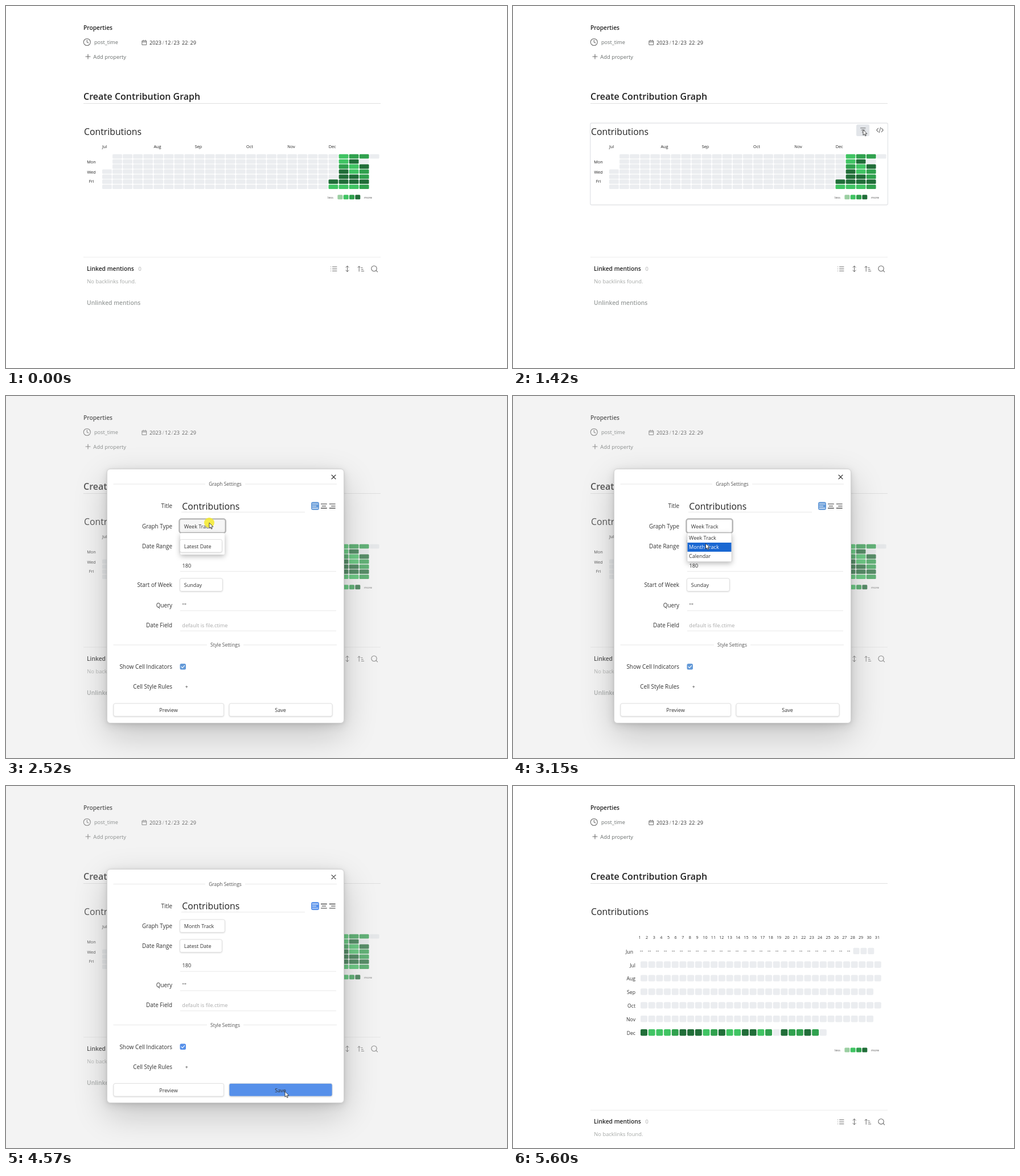
An HTML page that plays this animation: 880 px wide and 637 px high, repeating every 6.23 s.

```html
<!DOCTYPE html>
<html lang="en">
<head>
<meta charset="utf-8">
<title>Contribution graph settings</title>
<style>
html, body { margin: 0; width: 100%; height: 100%; overflow: hidden; background: #fff; }
#stage { position: relative; width: 880px; height: 637px; overflow: hidden; }
#stage > * { position: absolute; left: 0; top: 0; }
svg { width: 880px; height: 637px; font-family: "Open Sans", "Noto Sans", sans-serif; }
#cover { width: 880px; height: 637px; background: rgba(215,215,215,.3); }
#panel {
  left: 177px; width: 417px; box-sizing: border-box; background: #fff;
  border: 1px solid #d2d2d2; border-radius: 6px;
  box-shadow: 0 1px 5px rgba(0,0,0,.07), 0 4px 16px rgba(0,0,0,.11), 0 20px 60px rgba(0,0,0,.2);
}
.raised { filter: drop-shadow(0 1px 1px rgba(0,0,0,.13)); }
.popup { filter: drop-shadow(0 3px 5px rgba(0,0,0,.28)); }
.icon { fill: none; stroke: #6c6c6c; stroke-linecap: round; stroke-linejoin: round; }
</style>
</head>
<body>
<div id="stage">
  <svg id="page"></svg>
  <div id="cover"></div>
  <div id="panel"></div>
  <svg id="form"></svg>
  <svg id="pointer"></svg>
</div>
<script>
const LOOP = 6230, STEP = 80;
const OPEN = 1500, DROP = 2520, PICK = 3540, SAVED = 4650, LEAVE = 5600;
const INK = '#222', GREY = '#6a6f6e';
const EMPTY = '#ebedf0';
const LEVELS = [EMPTY, '#9bcfa2', '#40c463', '#30a14e', '#216e39'];
const DECEMBER = '422234442342244230433430';
const $ = id => document.getElementById(id);
const range = n => [...Array(n).keys()];

// y is the middle of the capitals
const text = (x, y, str, size, fill = INK, anchor = 'start', weight = 400) =>
  `<text x="${x}" y="${y + size * .36}" font-size="${size}" fill="${fill}" text-anchor="${anchor}" font-weight="${weight}">${str}</text>`;
const rect = (x, y, w, h, fill, r = 0, extra = '') =>
  `<rect x="${x}" y="${y}" width="${w}" height="${h}" rx="${r}" fill="${fill}" ${extra}/>`;
const line = (x1, x2, y, color = '#e8e8e8') => rect(x1, y - .5, x2 - x1, 1, color);
const icon = (d, width = 1, extra = '') => `<path class="icon" d="${d}" stroke-width="${width}" ${extra}/>`;
const group = (id, body) => `<g id="${id}">${body}</g>`;
const level = day => LEVELS[+DECEMBER[day]];

function header() {
  const date = [[252, '2023'], [279, '12'], [294.5, '23'], [309, '22'], [323.5, '29']];
  const marks = [[274.4, '/'], [290.4, '/'], [320, ':']];
  return text(136, 38, 'Properties', 10.2, INK, 'start', 600)
    + icon('M148.3 63.5a6 6 0 1 1-12 0a6 6 0 1 1 12 0M142.3 59.8v3.9l2.6 1.3', 1.1)
    + text(155, 64, 'post_time', 9.15, GREY)
    + icon('M239.3 61.3h7.4v7h-7.4zM239.3 63.3h7.4M241.2 60v1M244.8 60v1')
    + date.map(([x, s]) => text(x, 64.5, s, 9.15, '#333')).join('')
    + marks.map(([x, s]) => text(x, 64.5, s, 9.15, '#999')).join('')
    + icon('M140 89h8M144 85v8', 1.1)
    + text(153.3, 89.3, 'Add property', 9.4, GREY)
    + text(136, 159.3, 'Create Contribution Graph', 16, INK, 'start', 600)
    + line(136, 658, 171.5, '#e0e0e0')
    + text(137, 221, 'Contributions', 15.8);
}

function weekGraph() {
  const months = [[169, 'Jul'], [259.5, 'Aug'], [331.7, 'Sep'], [422, 'Oct'], [494.3, 'Nov'], [566.7, 'Dec']];
  const days = [['Mon', 274.3], ['Wed', 292], ['Fri', 308.8]];
  const cells = range(180).map(i => {
    const slot = i + 3, day = i - 156;
    return rect(169 + Math.floor(slot / 7) * 18.07, 260.8 + slot % 7 * 8.9, 16.8, 7.8,
      day < 0 ? EMPTY : level(day), 1.5);
  });
  return months.map(([x, s]) => text(x, 247, s, 7.3)).join('')
    + days.map(([s, y]) => text(150, y, s, 7.3, INK, 'middle')).join('')
    + cells.join('');
}

function monthGraph() {
  const months = [['Jun', 30], ['Jul', 31], ['Aug', 31], ['Sep', 30], ['Oct', 31], ['Nov', 30], ['Dec', 24]];
  const numbers = range(31).map(i =>
    text(i < 9 ? 222.5 + i * 12.62 : 337.5 + (i - 9) * 14.4, 266.3, i + 1, 7.2, '#333', 'middle'));
  const rows = months.map(([name, count], m) => {
    const y = 290.4 + m * 23.88;
    const cells = range(count).map(i => {
      if (m === 0) {
        return i < 27
          ? rect(223.2 + i * 14, y - .4, 2, 1, '#777') + rect(226 + i * 14, y - .4, 2, 1, '#777')
          : rect(597.5 + (i - 27) * 12.9, y - 5.7, 11, 11.4, EMPTY, 2);
      }
      return rect(224 + i * 13.69, y - 5.7, 12, 11.4, m === 6 ? level(i) : EMPTY, 2);
    });
    return text(m ? 215 : 211, y + 1.2, name, 8.7, '#333', 'end') + cells.join('');
  });
  return numbers.join('') + rows.join('');
}

function footer() {
  return text(565, 336.7, 'less', 5.6, '#555')
    + range(4).map(i => rect(582.4 + i * 10.3, 332.2, 9, 8, LEVELS[i + 1], 1.5)).join('')
    + text(629, 336.7, 'more', 5.6, '#555')
    + line(136, 658, 442, '#ececec')
    + text(142, 461.8, 'Linked mentions', 10.3, INK, 'start', 600)
    + text(232.5, 462.5, '0', 9.2, '#aaa')
    + icon('M573.5 459h7.5M573.5 462.6h7.5M573.5 466.2h7.5M570.6 459h.1M570.6 462.6h.1M570.6 466.2h.1')
    + icon('M599.5 457.5v10M596.9 460l2.6-2.6l2.6 2.6M596.9 465l2.6 2.6l2.6-2.6')
    + icon('M620.2 467v-9M618 460.2l2.2-2.3l2.2 2.3M624.3 460.5h1.6M624.3 463.4h3M624.3 466.4h4.4')
    + icon('M651.2 462a4.7 4.7 0 1 1-9.4 0a4.7 4.7 0 1 1 9.4 0M650 465.3l2.6 2.5', 1.1)
    + text(142.3, 484.5, 'No backlinks found.', 9.35, '#a5a8a6')
    + text(142, 522.7, 'Unlinked mentions', 10.3, '#999d9c', 'start', 600);
}

function hoverFrame() {
  return rect(135.8, 206, 522.6, 144, 'none', 2.5, 'stroke="#e3e5e8" stroke-width="1.3"')
    + rect(603, 208.5, 23, 20.5, '#e2e5e9', 2.5, 'id="tune"')
    + icon('M610.5 214.7h8.5M612 218.2h6M613.2 221.7h3.5', 1.1)
    + icon('M641.6 215.2l-3 3.2l3 3.2M647.2 215.2l3 3.2l-3 3.2M645.5 213.8l-2.2 9', 1.1);
}

const label = (y, str) => text(292, y, str, 9.9, '#333', 'end');
const box = (x, y, w, id = '') =>
  rect(x, y, w, 22.6, '#fff', 3, `class="raised" stroke="#d8d8d8" stroke-width=".8" id="${id}"`);
const picker = (y, w, str, ids = ['', '']) =>
  box(305.4, y - 11.6, w, ids[0])
  + `<g id="${ids[1]}">${text(312.7, y + .3, str, 9.1, '#333')}</g>`;
const section = (y, str, x1, x2) =>
  line(188.5, x1, y) + line(x2, 581, y) + text(385, y + .3, str, 8.4, '#555', 'middle');

function upper() {
  const bars = [[537.6, 'start'], [553, 'middle'], [567.8, 'end']].map(([x, side], n) => {
    const rows = [0, 1, 2].map(i => {
      const w = i === 1 ? 7.5 : 10.8;
      const dx = { start: 0, middle: (10.8 - w) / 2, end: 10.8 - w }[side];
      return `M${x + dx} ${190 + i * 3.7}h${w}`;
    });
    return `<path d="${rows.join('')}" stroke="${n ? '#333' : '#fff'}" stroke-width="1.1"/>`;
  });
  return icon('M572 139l7 7M579 139l-7 7', 1.1, 'style="stroke:#333"')
    + section(155, 'Graph Settings', 350, 420)
    + label(193.6, 'Title') + text(309.3, 194, 'Contributions', 15.8) + line(308, 525, 204.3)
    + rect(536, 186.6, 14, 14, '', 3, 'class="accent"') + bars.join('')
    + label(229, 'Graph Type') + picker(229, 79, 'Week Track', ['type', 'week'])
    + group('month', text(312.7, 229.3, 'Month Track', 9.1, '#333'))
    + rect(304.3, 216.3, 81.6, 24.6, 'none', 4, 'id="ring" stroke="#b2b2b2" stroke-width="2"')
    + rect(306, 241, 78, 38, '#fff', 2, 'id="peek" class="popup"')
    + label(264.3, 'Date Range') + picker(264, 74, 'Latest Date')
    + text(309.5, 298.6, '180', 9.15, '#333') + line(306, 580, 308.6);
}

function lower() {
  return label(368.3, 'Query') + text(309.5, 368.5, '""', 9.15, '#444') + line(306, 580, 377.8)
    + label(403, 'Date Field') + text(309.3, 403.3, 'default is file.ctime', 9.15, '#aaa') + line(306, 580, 413.3)
    + section(438, 'Style Settings', 353, 417)
    + label(476.8, 'Show Cell Indicators')
    + rect(305.5, 471, 10.5, 10.5, '', 2.5, 'class="accent"')
    + icon('M308 476.4l2 2l3.6-4', 1.2, 'style="stroke:#fff"')
    + label(511.7, 'Cell Style Rules') + text(317.2, 512.3, '+', 8.5, '#333', 'middle')
    + box(189, 541, 193.6) + text(285.5, 553, 'Preview', 9, '#333', 'middle')
    + box(392, 541, 181, 'save') + text(482, 553, 'Save', 9, '#333', 'middle');
}

function menu() {
  const options = ['Week Track', 'Month Track', 'Calendar'];
  return rect(306, 241, 78, 50.5, '#fff', 1.5, 'class="popup" stroke="#ccc" stroke-width=".6"')
    + rect(306.5, 242, 77, 16, '#1967d2', 0, 'id="bar"')
    + options.map((s, i) => `<g class="option">${text(309, 250.2 + i * 16, s, 9.1, '')}</g>`).join('');
}

$('page').innerHTML = header() + group('weeks', weekGraph()) + group('months', monthGraph())
  + group('foot', footer()) + group('hover', hoverFrame());
$('form').innerHTML = group('upper', upper())
  + group('start', label(332.8, 'Start of Week') + picker(332.5, 75, 'Sunday'))
  + group('lower', lower()) + group('menu', menu());
$('pointer').innerHTML = '<circle id="spot" r="9" fill="#f5ea2c" opacity=".85"/>'
  + '<path id="arrow" d="M0 0V9.6L2.2 7.6L3.7 11L5.2 10.4L3.8 7.1H6.9Z" fill="#fff" stroke="#222" stroke-width=".8"/>';
const options = [...document.querySelectorAll('.option text')];
const accents = document.querySelectorAll('.accent');

// start time, number of steps, end point
const MOVES = [
  [380, 8, 580, 212], [1020, 3, 615, 217.7], [1880, 8, 357, 223], [2830, 6, 337, 262.5],
  [3620, 7, 489, 536.5], [4180, 1, 490, 537.5], [5200, 6, 855, 632]
];
const CLICKS = [[1340, 1420], [DROP, 2600], [3380, PICK], [4410, 4570]];

function pointerAt(t) {
  let x = 748, y = 641;
  for (const [start, steps, toX, toY] of MOVES) {
    if (t < start) break;
    const p = Math.min(1, (Math.floor((t - start) / STEP) + 1) / steps);
    const e = p * p * (3 - 2 * p);
    x += (toX - x) * e;
    y += (toY - y) * e;
  }
  return { x, y };
}

const show = (id, on) => { $(id).style.display = on ? '' : 'none'; };
const between = (t, a, b) => t >= a && t < b;

function draw(t) {
  const { x, y } = pointerAt(t);
  const over = (x1, y1, x2, y2) => x >= x1 && x <= x2 && y >= y1 && y <= y2;
  const modal = between(t, OPEN, SAVED), picked = t >= PICK, saved = t >= SAVED;
  const accent = picked ? '#5690ea' : '#649ad8';

  show('weeks', !saved);
  show('months', saved);
  $('foot').setAttribute('transform', `translate(0 ${saved ? 128.4 : 0})`);
  show('hover', t < OPEN && over(136, 206, 658, 350));
  show('tune', over(603, 208, 626, 229));

  for (const id of ['cover', 'panel', 'form']) show(id, modal);
  $('panel').style.top = (picked ? 146 : 128) + 'px';
  $('panel').style.height = (picked ? 412 : 447.5) + 'px';
  const shift = picked ? 17.6 : 0;
  $('upper').setAttribute('transform', `translate(0 ${shift})`);
  $('lower').setAttribute('transform', `translate(0 ${-shift})`);
  show('start', !picked);
  show('week', !picked);
  show('month', picked);
  show('ring', between(t, DROP, 4410));
  show('peek', between(t, DROP, 2600));
  show('menu', between(t, 2600, PICK));
  $('type').setAttribute('fill', !picked && over(305, 217, 385, 240) ? '#f6f6f6' : '#fff');
  $('save').setAttribute('fill', picked && over(392, 523, 573, 547) ? accent : '#fff');
  accents.forEach(a => a.setAttribute('fill', accent));

  const chosen = y > 258 ? 1 : 0;
  $('bar').setAttribute('y', 242 + chosen * 16);
  options.forEach((o, i) => o.setAttribute('fill', i === chosen ? '#fff' : '#333'));

  show('pointer', between(t, 380, LEAVE));
  show('spot', CLICKS.some(([a, b]) => between(t, a, b)));
  for (const id of ['spot', 'arrow']) $(id).setAttribute('transform', `translate(${x} ${y})`);
}

const begin = performance.now();
function tick() {
  draw((performance.now() - begin) % LOOP);
  requestAnimationFrame(tick);
}
tick();
</script>
</body>
</html>
```
